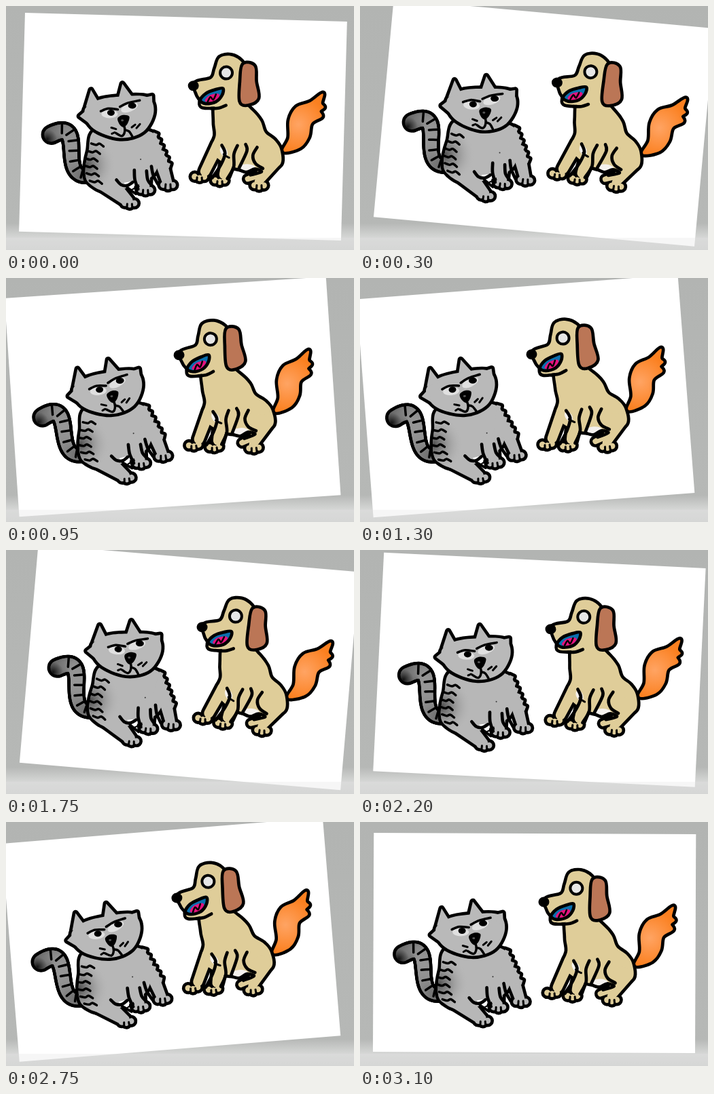
These frames come from a looping animation (512x360 px, 3.15 s). An HTML page with a canvas:

```html
<!DOCTYPE html>
<html lang="en">
<head>
<meta charset="utf-8">
<title>Cat and dog</title>
<style>
html, body { margin: 0; width: 100%; height: 100%; overflow: hidden; background: #b4b6b4; }
canvas { display: block; }
</style>
</head>
<body>
<canvas id="stage" width="512" height="360"></canvas>
<script>
const ctx = document.getElementById('stage').getContext('2d');
const { sin, cos, PI } = Math;
const STEP = 50, STEPS = 63;
const PIVOT = { x: 256, y: 340 };
const REST = 0.5; // tilt at which the picture's coordinates were taken
const INK = 4.7;

// two flat-topped swings per loop, the second a little early
function tilt(step) {
  const turn = 2 * PI * step / STEPS;
  const a = 2 * turn - 0.1 * sin(turn) + 0.18;
  return 0.3 + 5.55 * (sin(a) + 0.1 * sin(3 * a));
}

// curve through a flat list of points
function curve(p, closed) {
  const n = p.length / 2, path = new Path2D();
  const at = i => {
    const k = closed ? (i + n) % n : Math.min(Math.max(i, 0), n - 1);
    return [p[2 * k], p[2 * k + 1]];
  };
  path.moveTo(...at(0));
  for (let i = 0; i < (closed ? n : n - 1); i++) {
    const [a, b, c, d] = [at(i - 1), at(i), at(i + 1), at(i + 2)];
    path.bezierCurveTo(b[0] + (c[0] - a[0]) / 6, b[1] + (c[1] - a[1]) / 6,
      c[0] - (d[0] - b[0]) / 6, c[1] - (d[1] - b[1]) / 6, c[0], c[1]);
  }
  if (closed) path.closePath();
  return path;
}

const smooth = (...p) => curve(p, true);

function poly(...p) {
  const path = new Path2D();
  for (let i = 0; i < p.length; i += 2) path.lineTo(p[i], p[i + 1]);
  path.closePath();
  return path;
}

function oval(x, y, rx, ry = rx, turn = 0) {
  const path = new Path2D();
  path.ellipse(x, y, rx, ry, turn, 0, 2 * PI);
  return path;
}

// tapered leg from one round end to the other
function limb(x0, y0, r0, x1, y1, r1) {
  const a = Math.atan2(y1 - y0, x1 - x0), path = new Path2D();
  path.arc(x0, y0, r0, a + PI / 2, a + 1.5 * PI);
  path.arc(x1, y1, r1, a - PI / 2, a + PI / 2);
  path.closePath();
  return path;
}

function paw(x, y) {
  const path = new Path2D();
  for (const i of [-1, 0, 1]) path.addPath(oval(x + 7 * i, y + 2 - 2 * Math.abs(i), 4.5));
  return path;
}

function toes(x, y) {
  for (const i of [-1, 1]) line(3, x + 3.5 * i, y, x + 4 * i, y + 7);
}

function fill(color, path) {
  ctx.fillStyle = color;
  ctx.fill(path);
}

// several parts sharing one outline
function figure(color, ...parts) {
  ctx.lineWidth = 2 * INK;
  parts.forEach(p => ctx.stroke(p));
  parts.forEach(p => fill(color, p));
}

function line(width, ...p) {
  ctx.lineWidth = width;
  ctx.stroke(curve(p, false));
}

function glow(x, y, r, inner, outer) {
  const g = ctx.createRadialGradient(x, y, 0, x, y, r);
  g.addColorStop(0, inner);
  g.addColorStop(1, outer);
  return g;
}

// zigzag edge between two points, closed through a third
function fringe(x0, y0, x1, y1, teeth, x2, y2) {
  const p = [];
  for (let i = 0; i <= 2 * teeth; i++) {
    const t = i / (2 * teeth), out = i % 2 * 4;
    p.push(x0 + (x1 - x0) * t + out, y0 + (y1 - y0) * t - out / 2);
  }
  return poly(...p, x2, y2);
}

function catTail() {
  const bend = (t, a, b, c, d) => {
    const u = 1 - t;
    return u * u * u * a + 3 * u * u * t * b + 3 * u * t * t * c + t * t * t * d;
  };
  const at = t => [bend(t, 64, 118, 70, 122), bend(t, 194, 165, 262, 254), 10.5 - 3.5 * t];
  const dots = Array.from({ length: 61 }, (_, i) => i / 60);
  for (const t of dots) {
    const [x, y, r] = at(t);
    fill('#000', oval(x, y, r + INK));
  }
  for (const t of dots) {
    const [x, y, r] = at(t), g = 105 + 45 * sin(PI * t);
    fill(`rgb(${g},${g},${g})`, oval(x, y, r));
  }
  fill(glow(58, 201, 15, '#111', 'rgba(40,40,40,0)'), oval(63, 195, 10));
  for (let t = 0.12; t < 0.95; t += 0.13) {
    const [x, y, r] = at(t), [u, v] = at(t + 0.02);
    const a = Math.atan2(v - y, u - x) - PI / 2;
    line(3.5, x + r * cos(a), y + r * sin(a), x - 3 * cos(a), y - 3 * sin(a));
  }
}

function catBody() {
  const trunk = smooth(132, 185, 119, 218, 115, 250, 123, 266, 150, 276, 200, 262, 222, 235, 212, 188);
  figure('#b7b7b7', trunk,
    limb(146, 262, 15, 178, 290, 8), paw(181, 293),
    limb(199, 240, 12, 203, 270, 7), paw(204, 273),
    limb(225, 228, 9, 236, 262, 7), paw(237, 265),
    fringe(214, 188, 238, 240, 6, 205, 235));
  fill(glow(116, 238, 44, '#4c4c4c', 'rgba(183,183,183,0)'), trunk);
  for (let i = 0; i < 6; i++) {
    const x = 123 - 9 * sin(i * 0.6), y = 206 + 11 * i;
    line(3.5, x, y, x + 7, y + 2, x + 12, y, x + 18, y + 4);
  }
  fill('#fff', poly(172, 263, 188, 260, 187, 270, 180, 274));
  line(INK, 161, 259, 168, 266, 177, 267, 185, 262);
  line(4, 177, 270, 184, 275, 190, 279);
  line(INK, 187, 244, 188, 258, 193, 272);
  line(INK, 205, 245, 207, 258, 213, 266);
  line(INK, 212, 238, 215, 251, 222, 264);
  toes(181, 294);
  toes(204, 273);
  toes(237, 264);
  fill('#333', oval(196, 228, 1));
}

function catHead() {
  figure('#b9b9b9',
    smooth(112, 158, 131, 142, 163, 136, 204, 136, 214, 158, 199, 187, 165, 197, 126, 184),
    poly(114, 152, 121, 127, 134, 148), poly(160, 146, 167, 117, 186, 142),
    poly(190, 139, 211, 134, 212, 152), poly(116, 156, 105, 166, 119, 176));
  fill('#e0e0e0', oval(149, 162, 12, 6));
  fill('#e0e0e0', oval(178, 152, 13, 6, -0.4));
  line(3.5, 136, 158, 147, 154, 161, 155);
  line(3.5, 164, 151, 176, 145, 193, 141);
  fill('#000', oval(151, 160, 5.5, 4.5));
  fill('#000', oval(182, 149, 6, 4.5));
  fill('#000', smooth(161, 168, 169, 163, 178, 165, 176, 175, 170, 181, 164, 177));
  fill('#555', oval(168, 171, 2, 1.5));
  line(3.5, 170, 177, 172, 186, 168, 194, 159, 190);
  line(3.5, 172, 185, 178, 187, 183, 194);
  line(3, 152, 182, 159, 184);
  line(3, 153, 191, 157, 189);
  line(3, 182, 181, 187, 177);
  line(3, 189, 182, 194, 176);
}

function dogTail() {
  figure(glow(427, 172, 42, '#ffa463', '#fb8020'),
    smooth(406, 212, 414, 192, 414, 166, 424, 147, 444, 139, 462, 126, 460, 140, 464, 146,
      458, 152, 461, 160, 446, 170, 442, 190, 430, 206));
}

function dogBody() {
  figure('#dfcd99',
    smooth(307, 140, 304, 170, 306, 190, 301, 215, 330, 236, 375, 240, 401, 232, 401, 210,
      392, 196, 378, 185, 371, 168, 358, 153, 342, 142),
    smooth(304, 92, 310, 76, 326, 73, 341, 81, 349, 97, 349, 125, 338, 143, 316, 147,
      286, 148, 283, 138, 278, 130, 275, 114, 298, 107),
    limb(309, 205, 8, 291, 244, 7), paw(283, 252),
    limb(328, 215, 10, 319, 248, 7), paw(313, 257),
    limb(386, 228, 14, 370, 258, 6), paw(371, 263), limb(372, 247, 5, 354, 254, 4));
  fill('#f4f1ee', oval(318, 214, 5, 8, -0.5));
  fill('#f4f1ee', oval(353, 237, 12, 5));
  line(INK, 315, 205, 320, 217, 314, 234, 302, 253);
  line(3, 318, 218, 322, 221, 326, 223);
  line(INK, 338, 205, 333, 218, 333, 237, 324, 254);
  line(INK, 350, 203, 352, 213, 341, 238);
  line(INK, 367, 207, 361, 219, 365, 231, 376, 238);
  line(INK, 340, 240, 352, 244, 364, 239, 374, 243, 358, 248);
  toes(283, 253);
  toes(313, 258);
  toes(371, 263);
}

function dogFace() {
  line(INK, 298, 151, 310, 150, 320, 146);
  const mouth = smooth(282, 139, 290, 129, 304, 123, 315, 121, 314, 131, 305, 141, 290, 144);
  fill('#0b6fae', mouth);
  fill('#e5127d', smooth(289, 140, 295, 132, 307, 129, 310, 133, 300, 142));
  line(2.5, 293, 141, 297, 134, 301, 138, 305, 130);
  ctx.lineWidth = INK;
  ctx.stroke(mouth);
  const eye = oval(319.5, 98, 9);
  fill('#e6e6e6', eye);
  ctx.lineWidth = 4;
  ctx.stroke(eye);
  fill('#000', oval(271.5, 118, 8, 7.5));
  figure('#bb7656', smooth(345, 86, 360, 88, 362, 110, 366, 134, 352, 143, 342, 139, 342, 110));
}

function backdrop() {
  const g = ctx.createLinearGradient(0, 0, 0, 360);
  [[0, '#b2b4b2'], [0.89, '#b6b8b6'], [0.95, '#d6d7d6'], [1, '#d0d1d0']]
    .forEach(s => g.addColorStop(...s));
  ctx.fillStyle = g;
  ctx.fillRect(0, 0, 512, 360);
}

function draw(step) {
  const deg = tilt(step), rad = PI / 180;
  backdrop();
  ctx.save();
  ctx.translate(PIVOT.x, PIVOT.y - 0.25 * deg * deg);
  ctx.rotate(deg * rad);
  ctx.fillStyle = '#fff';
  ctx.fillRect(-237, -323, 474, 323);
  ctx.rotate(-REST * rad);
  ctx.translate(-PIVOT.x, -PIVOT.y);
  ctx.strokeStyle = '#000';
  ctx.lineCap = ctx.lineJoin = 'round';
  [catTail, catBody, catHead, dogTail, dogBody, dogFace].forEach(part => part());
  ctx.restore();
  ctx.fillStyle = 'rgba(225,225,225,.3)'; // floor haze
  ctx.fillRect(0, 342, 512, 18);
}

const start = performance.now();
function tick() {
  draw(Math.floor(Math.max(0, performance.now() - start) / STEP) % STEPS);
  requestAnimationFrame(tick);
}
tick();
</script>
</body>
</html>
```
